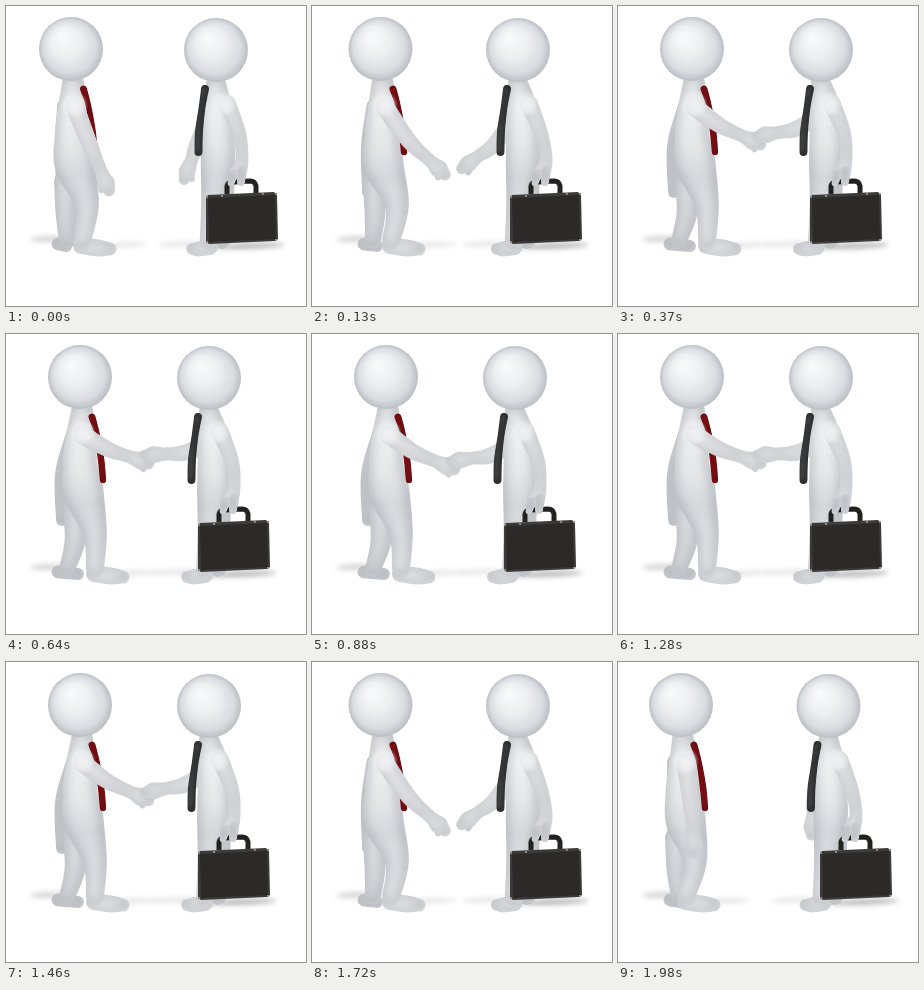
Animation of 300x300 px, one loop 5480 ms. Source, as an HTML page with a canvas:

```html
<!DOCTYPE html>
<html lang="en">
<head>
<meta charset="utf-8">
<title>Handshake</title>
<style>
html, body { margin: 0; height: 100%; overflow: hidden; background: #fff; }
canvas { display: block; width: 100vw; height: 100vh; }
</style>
</head>
<body>
<canvas id="stage" width="300" height="300"></canvas>
<script>
const ctx = document.getElementById('stage').getContext('2d');
const LOOP = 5480;
// The picture only changes at these moments.
const STEPS = [0, 130, 250, 370, 520, 610, 700, 790, 880, 960, 1040,
  1120, 1200, 1280, 1360, 1460, 1590, 1720, 1850, 1980];
const CLASP = STEPS.indexOf(370), RELEASE = STEPS.indexOf(1460);

// left:  head, tie, chest, hip, knee, ankle, back toe x; elbow x, y; hand x, y
// right: head, case x; elbow x, y; hand x, y
const STEP = { left: [65, 65.5, 67, 69, 81, 75, 60, 84, 139, 100, 177], right: [210, 199, 190, 142, 181, 166] };
const SHAKE = { left: [74, 74, 75, 78, 89, 88, 72, 101, 119, 135, 135], right: [203, 191, 178, 123, 147, 129] };
const MID = { left: [68.5, 69, 71, 72, 85, 78, 65, 97, 135, 127, 163], right: [206, 197, 183, 138, 156, 158] };
const IDLE = { left: [63, 64, 66, 68, 77, 67, 62, 73, 143, 76, 183], right: [210.5, 201, 196, 140, 194, 165] };
const POSES = [[0, STEP], [130, MID], [370, SHAKE], [1460, SHAKE], [1720, MID],
  [1850, STEP], [1980, IDLE], [LOOP, IDLE]];

const lerp = (a, b, u) => a + (b - a) * u;
const mixList = (a, b, u) => a.map((v, i) => lerp(v, b[i], u));

function poseAt(t) {
  const i = Math.max(1, POSES.findIndex(p => p[0] >= t));
  const [t0, a] = POSES[i - 1], [t1, b] = POSES[i], u = (t - t0) / (t1 - t0);
  return { left: mixList(a.left, b.left, u), right: mixList(a.right, b.right, u) };
}

// The clasped hands swing up and down twice, six steps each.
function liftAt(step) {
  if (step < CLASP || step > RELEASE) return 0;
  return -5.5 * (1 - Math.cos((step - CLASP) / 6 * 2 * Math.PI));
}

// Smooth tube through [x, y, radius] points.
function tube(points) {
  const samples = [], n = points.length - 1, steps = 8;
  const at = i => points[Math.min(n, Math.max(0, i))];
  for (let s = 0; s <= n * steps; s++) {
    const i = Math.min(n - 1, Math.floor(s / steps)), u = s / steps - i;
    samples.push([0, 1, 2].map(k => {
      const [a, b, c, d] = [at(i - 1)[k], at(i)[k], at(i + 1)[k], at(i + 2)[k]];
      return b + u / 2 * (c - a + u * (2 * a - 5 * b + 4 * c - d + u * (3 * (b - c) + d - a)));
    }));
  }
  const angle = i => {
    const a = samples[Math.max(0, i - 1)], b = samples[Math.min(samples.length - 1, i + 1)];
    return Math.atan2(b[1] - a[1], b[0] - a[0]);
  };
  const path = new Path2D(), last = samples.length - 1, q = Math.PI / 2;
  const edge = (i, side) => {
    const [x, y, r] = samples[i], a = angle(i) + side * q;
    path.lineTo(x + r * Math.cos(a), y + r * Math.sin(a));
  };
  const cap = (i, turn) => {
    const [x, y, r] = samples[i], a = angle(i) + turn;
    path.arc(x, y, r, a - q, a + q);
  };
  for (let i = 0; i <= last; i++) edge(i, -1);
  cap(last, 0);
  for (let i = last; i >= 0; i--) edge(i, 1);
  cap(0, Math.PI);
  path.closePath();
  return path;
}

function withStops(gradient, ...stops) {
  stops.forEach(([at, color]) => gradient.addColorStop(at, color));
  return gradient;
}

// Bodies are bright at the chest and feet and shaded around the hips.
const SKIN = withStops(ctx.createLinearGradient(0, 76, 0, 248),
  [0, '#e2e4e6'], [.15, '#eff0f2'], [.35, '#e6e8ea'], [.55, '#d6d9dc'], [.75, '#dfe1e4'], [1, '#eeeff1']);

// Fill with a soft dark rim cast inwards.
function solid(path, fill, rim = 'rgba(112,117,124,.62)', blur = 11) {
  ctx.save();
  ctx.clip(path);
  ctx.fillStyle = fill;
  ctx.fill(path);
  ctx.shadowColor = rim;
  ctx.shadowBlur = blur;
  ctx.shadowOffsetX = 999;
  ctx.shadowOffsetY = -1;
  ctx.translate(-1000, 0);
  ctx.lineWidth = 5;
  ctx.stroke(path);
  ctx.restore();
}

const limb = (...points) => solid(tube(points), '#eeeff1');
const torso = (...points) => solid(tube(points), SKIN);
const farLimb = (...points) => solid(tube(points), '#dcdee1');

function glow(x, y, r) {
  ctx.fillStyle = withStops(ctx.createRadialGradient(x, y, 2, x, y, r),
    [0, '#eff0f2'], [.5, '#eff0f2c0'], [1, '#eff0f200']);
  ctx.fillRect(x - r, y - r, 2 * r, 2 * r);
}

function head(x, y) {
  ctx.fillStyle = withStops(ctx.createRadialGradient(x - 9, y - 13, 2, x, y, 32),
    [0, '#f8f9fa'], [.45, '#eceef0'], [.8, '#d9dce0'], [1, '#bbbfc4']);
  ctx.beginPath();
  ctx.arc(x, y, 32, 0, 7);
  ctx.fill();
}

function polygon(points, fill) {
  ctx.fillStyle = fill;
  ctx.beginPath();
  points.forEach(([x, y]) => ctx.lineTo(x, y));
  ctx.closePath();
  ctx.fill();
}

function shadow(x, y, rx, ry, alpha) {
  ctx.save();
  ctx.filter = 'blur(2.5px)';
  ctx.fillStyle = `rgba(50,50,55,${alpha})`;
  ctx.beginPath();
  ctx.ellipse(x, y, rx, ry, -.04, 0, 7);
  ctx.fill();
  ctx.restore();
}

function arm(shoulder, [ex, ey], [hx, hy], palm, thumbSide) {
  const a = Math.atan2(hy - ey, hx - ex), c = Math.cos(a), s = Math.sin(a);
  const thumb = [hx + 5 * c + thumbSide * 7 * s, hy + 5 * s - thumbSide * 7 * c, 3];
  limb([hx - 7 * c, hy - 7 * s, 4], thumb);
  limb(shoulder, [ex, ey, 8], [hx - 13 * c, hy - 13 * s, 6.5],
    [hx, hy, palm], [hx + 8 * c, hy + 8 * s, palm - 3]);
}

function drawLeft([hx, tie, chest, hip, knee, ankle, backToe, ex, ey, x, y], lift) {
  shadow(42, 233, 18, 3, .2);
  shadow(ankle + 40, 239, 26, 2.5, .12);
  farLimb([hx - 6, 100, 8], [55, 140, 6], [56, 186, 6]);
  farLimb([52, 238, 6.5], [backToe, 240, 6]);
  farLimb([hip - 9, 176, 12], [hip - 9, 207, 10.5], [61, 235, 8]);
  torso([ankle, 240, 8], [ankle + 17, 242, 8.5], [ankle + 29, 243, 6.5]);
  torso([hx + 2, 77, 11], [chest, 104, 15.5], [chest - 1, 130, 17.5], [hip, 160, 20],
    [knee, 199, 12], [ankle + 1, 235, 9]);
  solid(tube([[tie + 12, 83, 3.5], [tie + 17, 100, 2.8], [tie + 21, 125, 3.3], [tie + 23, 146, 3.2]]),
    '#a8161c', 'rgba(70,8,12,.7)', 4);
  head(hx, 43);
  arm([chest + 2, 101, 9.5], [ex, ey + lift / 2], [x, y + lift], 9, -1);
  glow(chest + 1, 99, 14);
}

function drawCase(x) {
  ctx.strokeStyle = '#222220';
  ctx.lineWidth = 5;
  ctx.lineJoin = 'round';
  ctx.beginPath();
  ctx.moveTo(x + 22, 188);
  ctx.lineTo(x + 22, 180);
  ctx.quadraticCurveTo(x + 23, 176, x + 28, 176);
  ctx.lineTo(x + 45, 175);
  ctx.quadraticCurveTo(x + 50, 175, x + 51, 180);
  ctx.lineTo(x + 51, 187);
  ctx.stroke();
  polygon([[x + 1, 191], [x + 3, 189], [x + 69, 186], [x + 72, 189], [x + 73, 233], [x + 70, 235],
    [x + 4, 238], [x + 1, 236]], '#3c3b39');
  polygon([[x + 3, 192], [x + 70, 189], [x + 71, 233], [x + 4, 236]], '#2b2a28');
  for (const [cx, cy] of [[2, 191], [71, 188], [2, 236], [71, 234], [17, 190], [58, 188]]) {
    ctx.fillStyle = '#8a8a88';
    ctx.fillRect(x + cx - 1, cy - 1, 2, 2);
  }
}

function drawRight([hx, bag, ex, ey, x, y], lift) {
  const body = 206 + (bag - 191) * .45, foot = 181 + (bag - 191) * .65;
  shadow(foot - 12, 238, 22, 2.5, .12);
  shadow(bag + 45, 240, 35, 3, .33);
  arm([body - 7, 111, 8.5], [ex, ey + lift / 2], [x, y + lift], 8.5, 1);
  farLimb([body + 6, 165, 13], [body + 6, 200, 12], [body + 6, 234, 9]);
  torso([foot + 18, 241, 8], [foot + 6, 243, 7.5], [foot, 243, 6]);
  torso([hx, 77, 10], [body + 1, 102, 15.5], [body + 2, 130, 16.5], [body + 2, 158, 17],
    [body - 2, 198, 12.5], [body - 7, 235, 9]);
  solid(tube([[hx - 11, 83, 4], [hx - 14, 102, 3.4], [hx - 17, 126, 4], [hx - 17.5, 146, 4]]),
    '#58595b', 'rgba(20,20,22,.75)', 4);
  head(hx, 44);
  limb([hx + 11, 98, 9], [hx + 23, 127, 7], [bag + 37, 152, 6.5], [bag + 33, 166, 8.5],
    [bag + 29, 174, 5.5]);
  glow(hx + 8, 98, 13);
  drawCase(bag);
  limb([bag + 37, 165, 5], [bag + 36, 176, 4]);
  limb([bag + 29, 168, 4.5], [bag + 26, 177, 3.5]);
}

function draw(now) {
  const time = now % LOOP;
  const step = STEPS.findLastIndex(s => s <= time);
  const pose = poseAt(STEPS[step]), lift = liftAt(step);
  ctx.fillStyle = '#fff';
  ctx.fillRect(0, 0, 300, 300);
  drawLeft(pose.left, lift);
  drawRight(pose.right, lift);
}

const start = performance.now();
function tick() {
  draw(performance.now() - start);
  requestAnimationFrame(tick);
}
tick();
</script>
</body>
</html>
```
